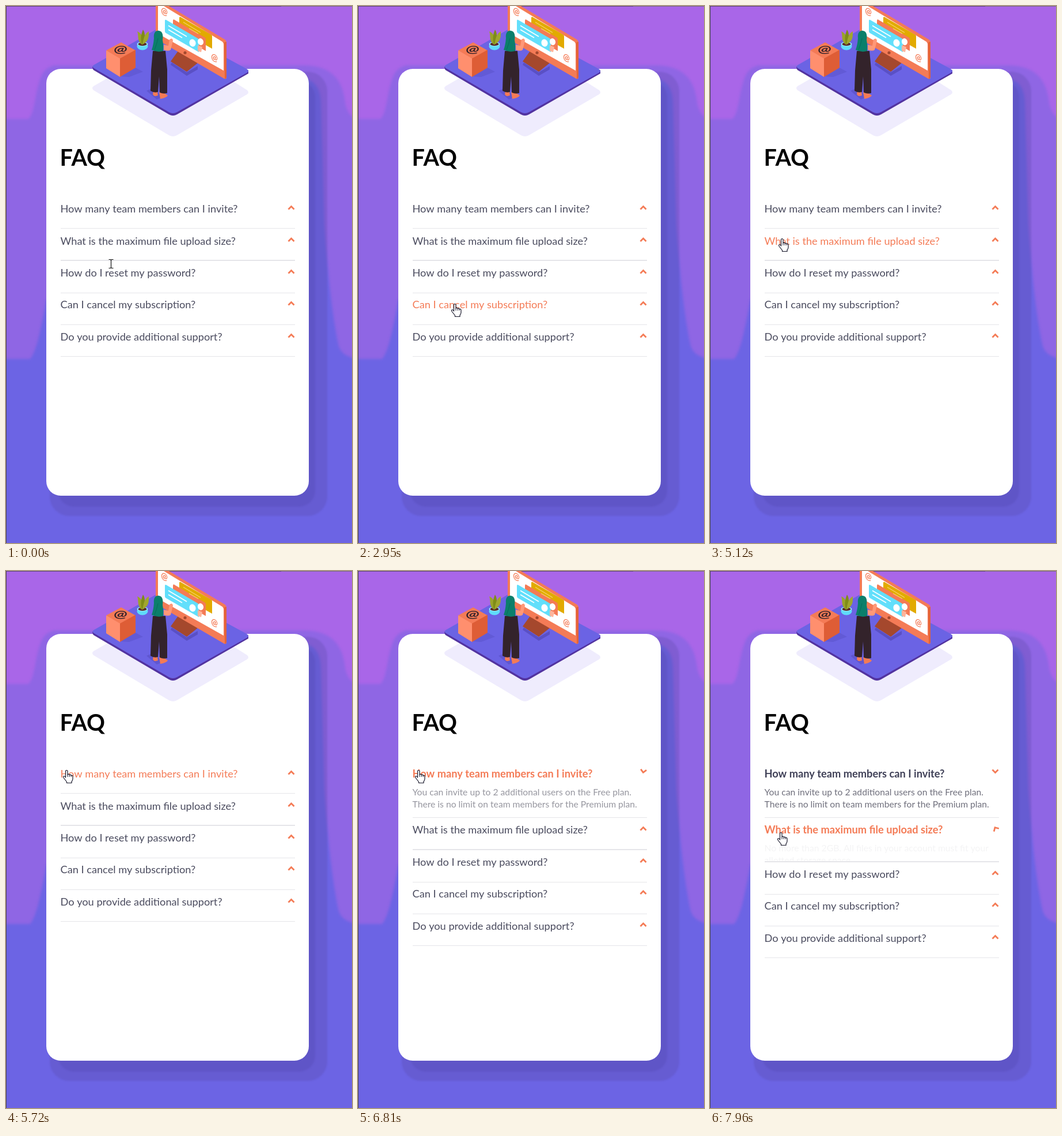
These frames come from a looping animation (601 px wide and 931 px high, 7.99 s). An HTML page with a canvas:

```html
<!DOCTYPE html>
<html lang="en">
<head>
<meta charset="utf-8">
<title>FAQ accordion</title>
<style>
html, body { margin: 0; width: 100%; height: 100%; overflow: hidden; background: #6c64e4; }
canvas { display: block; }
</style>
</head>
<body>
<canvas id="stage" width="601" height="931"></canvas>
<script>
const W = 601, H = 931, LOOP = 7990;
const RED = '#f47b56', FONT = 'Lato, "Open Sans", sans-serif';
const stage = document.getElementById('stage').getContext('2d');

const rows = [
  { q: 'How many team members can I invite?', base: 358, line: 385, click: 6450,
    a: ['You can invite up to 2 additional users on the Free plan.',
        'There is no limit on team members for the Premium plan.'] },
  { q: 'What is the maximum file upload size?', base: 413.5, line: 440, click: 7890,
    a: ['No more than 2GB. All files in your account must fit your',
        'allotted storage space.'] },
  { q: 'How do I reset my password?', base: 469, line: 497 },
  { q: 'Can I cancel my subscription?', base: 524, line: 552 },
  { q: 'Do you provide additional support?', base: 580, line: 607 }
];

// Pointer hot spot: time, x, y
const trail = [
  [20, 182, 447], [250, 177, 467], [1190, 177, 467], [1430, 171, 512],
  [1640, 169, 513], [1790, 168, 514], [2930, 168, 515], [2950, 168, 517],
  [3120, 169, 571], [3420, 168, 570], [3950, 168, 570], [4080, 45, 482],
  [4180, 9, 414], [4330, 58, 361], [4440, 128, 356], [4600, 125, 403],
  [5120, 125, 404], [5350, 62, 388], [5520, 80, 356], [5720, 105, 346],
  [6950, 105, 346], [7290, 123, 454]
];

// CSS "ease": cubic-bezier(.25, .1, .25, 1)
function ease(x) {
  if (x <= 0) return 0;
  if (x >= 1) return 1;
  const bez = (s, a, b) => 3 * s * (1 - s) ** 2 * a + 3 * s * s * (1 - s) * b + s ** 3;
  let lo = 0, hi = 1;
  for (let i = 0; i < 20; i++) {
    const mid = (lo + hi) / 2;
    if (bez(mid, .25, .25) < x) lo = mid; else hi = mid;
  }
  return bez(lo, .1, 1);
}

function pointerAt(t) {
  const i = trail.findIndex(p => p[0] > t);
  if (i === 0) return trail[0].slice(1);
  if (i < 0) return trail[trail.length - 1].slice(1);
  const [t0, x0, y0] = trail[i - 1], [t1, x1, y1] = trail[i];
  const k = (t - t0) / (t1 - t0);
  return [Math.round(x0 + (x1 - x0) * k), Math.round(y0 + (y1 - y0) * k)];
}

const svg = (c, d, fill) => { c.fillStyle = fill; c.fill(new Path2D(d)); };

function rounded(c, x, y, w, h, r, fill) {
  c.fillStyle = fill;
  c.beginPath();
  c.roundRect(x, y, w, h, r);
  c.fill();
}

function ellipse(c, x, y, rx, ry, fill, turn = 0) {
  c.fillStyle = fill;
  c.beginPath();
  c.ellipse(x, y, rx, ry, turn, 0, 7);
  c.fill();
}

function stroke(c, d, color, width) {
  c.strokeStyle = color;
  c.lineWidth = width;
  c.stroke(new Path2D(d));
}

function atSign(c, x, y, size, color, m) {
  c.save();
  c.translate(x, y);
  c.transform(...m, 0, 0);
  c.font = `bold ${size}px ${FONT}`;
  c.textAlign = 'center';
  c.textBaseline = 'middle';
  c.fillStyle = color;
  c.fillText('@', 0, 0);
  c.restore();
}

function drawBackdrop(c) {
  c.fillStyle = '#a966e8';
  c.fillRect(0, 0, W, H);
  c.filter = 'blur(2px)';
  svg(c, 'M-9 196H38C50 190 50 150 60 125Q66 107 84 103H520C565 104 583 128 588 160Q591 192 611 196V640H-9Z', '#8f66e4');
  svg(c, 'M-9 612H42C52 600 59 570 70 510L520 126Q545 132 547 165L553 380C559 470 568 545 578 590Q584 608 611 612V941H-9Z', '#6c64e4');
  c.filter = 'blur(1.5px)';
  rounded(c, 76, 114, 482, 770, 34, 'rgba(85,70,160,.26)');
  rounded(c, 90, 130, 447, 738, 28, 'rgba(70,55,150,.18)');
  c.filter = 'none';
  c.fillStyle = '#5a4470';
  c.fillRect(0, 0, W, 1);
  c.fillStyle = '#77677f';
  c.fillRect(478, 0, 123, 1);
  c.fillStyle = '#45435a';
  c.fillRect(0, 0, 1, H);
  rounded(c, 70, 109, 456, 740, 25, '#fff');
}

function drawDesk(c) {
  svg(c, 'M152 139L286 62L419 146Q423 150 419 153L297 224Q290 228 283 224L152 146Q148 142 152 139Z', '#efecfd');
  svg(c, 'M150 105L290 182L421 111V117L297 188Q290 192 283 188L152 111Q150 109 150 105Z', '#5233a0');
  svg(c, 'M153 102L276 32L418 109Q424 113 418 116L297 184Q290 188 283 184L153 108Q148 105 153 102Z', '#6b63e4');
  // Soft cast shadows
  svg(c, 'M198 122L225 107L238 114L214 123Z', '#625ad6');
  svg(c, 'M288 98L314 115L333 104V110L314 121L286 102Z', '#5a50c5');
  svg(c, 'M244 147L256 142L272 158L262 162Z', '#5f56d0');
}

function drawCube(c) {
  svg(c, 'M200 63L225 77L198 92L174 77Z', '#f47b56');
  svg(c, 'M174 77L198 91V123L174 108Z', '#ff8f6e');
  svg(c, 'M198 91L225 76V107L198 123Z', '#de5d36');
  atSign(c, 199, 75.5, 28, '#33232b', [1, 0, -.1, .62]);
}

function drawPlant(c) {
  ellipse(c, 237, 70, 9.5, 6.5, '#5fdcfa');
  ellipse(c, 237, 66, 9.5, 4, '#93eafc');
  ellipse(c, 237, 66, 7.5, 3, '#5a2b2b');
  svg(c, 'M236 67C227 60 231 52 228 44C236 47 239 56 237 67Z', '#9aa32a');
  svg(c, 'M236 67C233 56 235 48 238 41C243 48 241 58 237 67Z', '#7f8c17');
  svg(c, 'M237 67C239 57 240 48 248 44C248 53 249 60 237 67Z', '#a0a72e');
}

function drawMonitor(c) {
  svg(c, 'M299 78L334 98L314 114L286 96Z', '#a5482d');
  svg(c, 'M260 0H283L380 58Q383 60 383 65V124Q383 127 379 126L262 58Q260 56 260 52Z', RED);
  svg(c, 'M379 63L383 62V124L380 127Z', '#e2633a');
  svg(c, 'M264 0H274L376 62Q378 64 378 68V112L264 48Z', '#fff');
  ellipse(c, 311, 81, 2.6, 2.6, '#a5482d');
  svg(c, 'M303 19L357 50Q358 51 358 53V74L301 42V21Q301 18 303 19Z', '#e2aa00');
  svg(c, 'M291 23L346 55Q347 56 347 58V78L290 45V25Z', RED);
  stroke(c, 'M308 28L338 46M318 39L334 48', '#f7d36a', 1.2);
  svg(c, 'M278 24L333 56Q335 57 335 59V80L278 47Q276 46 276 44V26Q276 23 278 24Z', '#62dffb');
  stroke(c, 'M282 34L314 53M282 41L306 55', '#fff', 1.6);
  ellipse(c, 324, 64, 5.5, 6.5, '#fff', -.3);
  ellipse(c, 338, 62, 5, 6, '#fff', -.3);
  svg(c, 'M333 68L341 71L339 80L333 78Z', '#ffb49b');
  atSign(c, 275, 10, 16, RED, [.85, .3, 0, 1]);
  atSign(c, 362, 90, 16, RED, [.85, .3, 0, 1]);
}

function drawWoman(c) {
  svg(c, 'M274 67L282 69L284 58Q289 54 290 60L286 76Q282 79 274 76Z', '#ff9878');
  svg(c, 'M256 147L263 149L264 155Q257 158 255 153Z', RED);
  svg(c, 'M266 149L275 151L281 155Q279 159 268 161Z', RED);
  svg(c, 'M255 78H277L280 110V151Q273 153 267 150L266 122L264 149Q257 151 251 147L252 112Z', '#33232b');
  svg(c, 'M257 56C256 46 260 42 266 43C273 44 273 53 272 59Q274 70 273 78Q263 81 253 76Q256 68 257 56Z', '#0b7f6b');
  stroke(c, 'M264 56Q262 66 258 76', '#096b5b', 1);
}

function buildScene() {
  const layer = document.createElement('canvas');
  layer.width = W;
  layer.height = H;
  const c = layer.getContext('2d');
  drawBackdrop(c);
  drawDesk(c);
  drawCube(c);
  drawPlant(c);
  drawMonitor(c);
  drawWoman(c);
  c.fillStyle = '#000';
  c.font = `bold 39.5px ${FONT}`;
  c.fillText('FAQ', 93.5, 277);
  return layer;
}

function drawChevron(c, y, turn) {
  c.save();
  c.translate(495.5, y);
  c.rotate(Math.PI * (1 - turn));
  stroke(c, 'M-5 -4L0 1L5 -4', RED, 2.8);
  c.restore();
}

function drawAnswer(c, row, y, height, alpha) {
  c.save();
  c.beginPath();
  c.rect(90, y + 10, 420, height + 16);
  c.clip();
  c.globalAlpha = alpha;
  c.font = `15.7px ${FONT}`;
  c.fillStyle = '#6f6f7c';
  row.a.forEach((s, i) => c.fillText(s, 94.5, y + 31 + 21 * i));
  c.restore();
}

function drawPointer(c, kind, x, y) {
  c.save();
  c.translate(x, y);
  c.lineJoin = 'round';
  if (kind === 'text') {
    stroke(c, 'M-3.5 -7.5H-1.5Q0 -7.5 .5 -6.5Q1 -7.5 2.5 -7.5H4.5M.5 -6.5V6.5M-3.5 7.5H-1.5Q0 7.5 .5 6.5Q1 7.5 2.5 7.5H4.5', '#111', 1.2);
  } else {
    const d = kind === 'hand'
      ? 'M-1.5 12V1.5Q-1.5 -.5 .3 -.5Q2 -.5 2 1.5V7Q4.5 5.2 5.2 7.5Q7.6 6.2 8.2 8.5Q11 7.6 11 10.5V14.5Q10.8 17 9 19V21.5H.5V19.5L-5 12.5Q-6.2 10 -4 9.5Q-3 9.5 -1.5 12Z'
      : 'M0 0V16L3.8 12.6L6.4 18.4L9 17.3L6.5 11.6H11.5Z';
    svg(c, d, '#fff');
    stroke(c, d, '#17172a', 1.2);
    if (kind === 'hand') stroke(c, 'M2 7V11M5.2 7.5V11M8.2 8.5V11', '#17172a', 1);
  }
  c.restore();
}

const scene = buildScene();

function draw(t) {
  const c = stage;
  const [px, py] = pointerAt(t);
  const inList = px >= 95 && px <= 501 && py > 335 && py < 650;
  let shift = 0, kind = inList ? 'text' : 'arrow';
  c.drawImage(scene, 0, 0);

  rows.forEach((row, i) => {
    const age = row.click ? t - row.click : -1;
    const open = age >= 0;
    const fade = ease(age / 830);
    const height = Math.min(41.7, 290 * fade);
    const y = row.base + shift;
    const hover = inList && py >= y - 17 && py <= y + 5;
    if (hover) kind = 'hand';

    c.font = open ? `bold 18.25px ${FONT}` : `18.2px ${FONT}`;
    c.fillStyle = hover ? RED : open ? '#3f4057' : '#4a4b5e';
    c.fillText(row.q, 94.5, y);
    drawChevron(c, y - 9.6, ease(age / 500));
    if (open) drawAnswer(c, row, y, height, fade);

    shift += height;
    c.fillStyle = '#e5e5e9';
    c.fillRect(95, Math.round(row.line + shift), 407, i === 1 ? 2 : 1);
  });

  // Press mark while the button is held
  if (rows.some(r => r.click && t >= r.click - 210 && t < r.click)) {
    ellipse(c, px + 2, py, 10, 10, 'rgba(255,255,0,.47)');
  }
  drawPointer(c, kind, px, py);
}

const start = performance.now();
function tick() {
  draw((performance.now() - start) % LOOP);
  requestAnimationFrame(tick);
}
tick();
</script>
</body>
</html>
```
